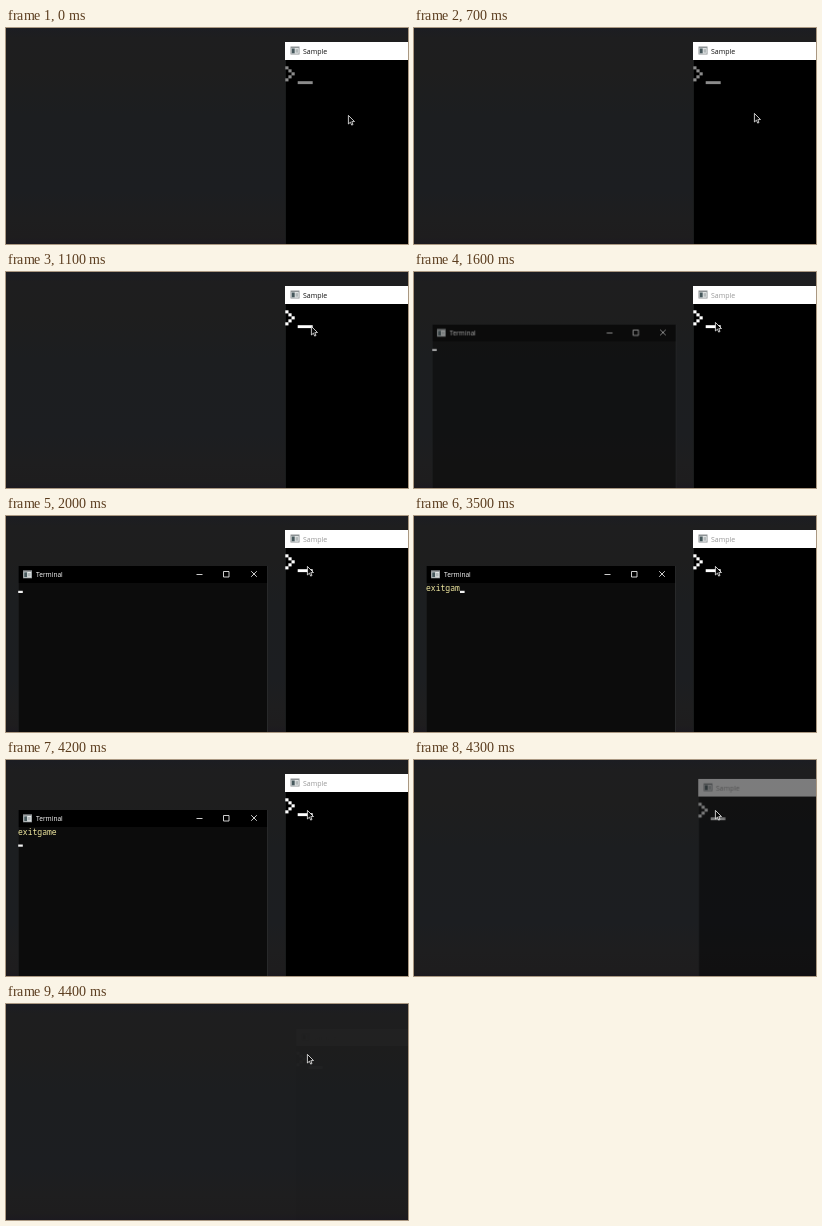
These frames come from a looping animation (402 px wide and 216 px high, 5.5 s). An HTML page with a canvas:

```html
<!DOCTYPE html>
<html lang="en">
<head>
<meta charset="utf-8">
<title>Closing a window from a terminal</title>
<style>
  html, body { margin: 0; width: 100%; height: 100%; overflow: hidden; background: #1d1e1f; }
  canvas { display: block; width: 402px; height: 216px; }
</style>
</head>
<body>
<canvas id="stage" width="402" height="216"></canvas>
<script>
const LOOP = 5500;
const STEP = 100;
const UI_FONT = '"Open Sans", "Noto Sans", sans-serif';
const MONO_FONT = '"Noto Sans Mono", "Liberation Mono", monospace';
const CHAR_WIDTH = 4.83;
const COMMAND = 'exitgame';
const KEY_TIMES = [2500, 2800, 2900, 3000, 3300, 3400, 3500, 3600];
const POINTER_PATH = [[342, 87], [340, 85], [334, 79], [324, 70], [313, 61], [305, 54], [302, 51], [301, 50]];

const ctx = document.getElementById('stage').getContext('2d');
// Windows are composed here first so they fade as one surface.
const layer = document.createElement('canvas');
layer.width = 480;
layer.height = 280;
const win = layer.getContext('2d');

const backdrop = ctx.createLinearGradient(0, 0, 0, 216);
[[0, '#1c1d22'], [0.05, '#1e1e1f'], [0.2, '#1e1e1e'], [0.4, '#1c1e20'],
 [0.75, '#1c1e21'], [0.88, '#1e1e1f'], [0.97, '#1e1d1e'], [1, '#1c1a20']]
  .forEach(([stop, color]) => backdrop.addColorStop(stop, color));

function box(color, x, y, w, h) {
  win.fillStyle = color;
  win.fillRect(x, y, w, h);
}

function label(text, x, y, color, font) {
  win.font = font;
  win.fillStyle = color;
  win.fillText(text, x, y);
}

function windowIcon(x, y) {
  box('#8d9294', x, y, 9, 8);
  box('#e9eded', x + 0.8, y + 1.6, 7.4, 5.6);
  box('#46585c', x + 1.2, y + 2, 3, 4.8);
  box('#b4babb', x + 5, y + 2.6, 2.6, 3.6);
}

function drawSample(active, hovered) {
  box('#000', 279, 32, 201, 248);
  box('#fff', 279, 14, 201, 18);
  box('#2b2d2d', 279, 32, 0.6, 248);
  windowIcon(284.5, 18.5);
  label('Sample', 297, 25.6, active ? '#111' : '#999', '7px ' + UI_FONT);
  const ink = hovered ? '#fff' : '#8c8c8c';
  for (let row = 0; row < 5; row++) {
    const column = 2 - Math.abs(row - 2);
    box(ink, 279.3 + column * 3.1, 38.3 + row * 3, 3.2, 3.1);
  }
  box(ink, 291.7, 53.2, 15, 2.9);
}

function drawCaptionButtons() {
  win.strokeStyle = '#e4e4e4';
  win.lineWidth = 0.9;
  win.beginPath();
  win.moveTo(190.5, 58.5);
  win.lineTo(196.5, 58.5);
  win.rect(217.5, 55.5, 5.5, 5.5);
  win.moveTo(245.2, 55.2);
  win.lineTo(250.8, 60.8);
  win.moveTo(250.8, 55.2);
  win.lineTo(245.2, 60.8);
  win.stroke();
}

function drawTerminal(t) {
  box('#0c0c0c', 12, 67, 250, 213);
  box('#000', 12, 50, 250, 17);
  box('#303133', 261.2, 50, 0.8, 230);
  box('#252628', 12, 50, 0.5, 230);
  windowIcon(17, 54.3);
  label('Terminal', 30, 61, '#fff', '6.6px ' + UI_FONT);
  drawCaptionButtons();

  const typed = KEY_TIMES.filter(time => time <= t).length;
  label(COMMAND.slice(0, typed), 12, 75.4, '#f0e8a0', '8.05px ' + MONO_FONT);
  const entered = t >= 4100;
  const column = entered ? 0 : typed;
  box('#f2f2f2', 12.2 + column * CHAR_WIDTH, entered ? 84.5 : 74.8, 4.6, 2.2);
}

function present(draw, scale, alpha, cx, cy) {
  win.clearRect(0, 0, layer.width, layer.height);
  draw();
  ctx.save();
  ctx.globalAlpha = alpha;
  ctx.translate(cx, cy);
  ctx.scale(scale, scale);
  ctx.drawImage(layer, -cx, -cy);
  ctx.restore();
}

function drawPointer(x, y) {
  const outline = [[0, 0], [0, 8.6], [2, 6.8], [3.3, 9.7], [4.6, 9.1], [3.4, 6.3], [6.1, 6.1]];
  ctx.beginPath();
  outline.forEach(([dx, dy]) => ctx.lineTo(x + 0.4 + dx, y + 0.4 + dy));
  ctx.closePath();
  ctx.fillStyle = '#0a0a0a';
  ctx.fill();
  ctx.strokeStyle = '#f4f4f4';
  ctx.lineWidth = 0.8;
  ctx.stroke();
}

function render(t) {
  ctx.fillStyle = backdrop;
  ctx.fillRect(0, 0, 402, 216);

  const closing = Math.min(2, Math.max(0, (t - 4200) / STEP));
  const [scale, alpha] = [[1, 1], [0.98, 0.42], [0.957, 0.015]][closing];
  present(() => drawSample(t < 1500, t >= 1100), scale, alpha, 540, 260);

  if (t >= 1500 && t < 4300) {
    const age = (t - 1500) / STEP;
    const grow = age < 5 ? 1 - 0.07 * 0.31 ** age : 1;
    present(() => drawTerminal(t), grow, Math.min(1, 0.2 + 0.42 * age), 290, 172);
  }

  const leg = Math.min(POINTER_PATH.length - 1, Math.max(0, (t - 600) / STEP));
  drawPointer(...POINTER_PATH[leg]);
}

const start = performance.now();
function tick() {
  const elapsed = (performance.now() - start) % LOOP;
  render(Math.floor(elapsed / STEP) * STEP);
  requestAnimationFrame(tick);
}
tick();
</script>
</body>
</html>
```
